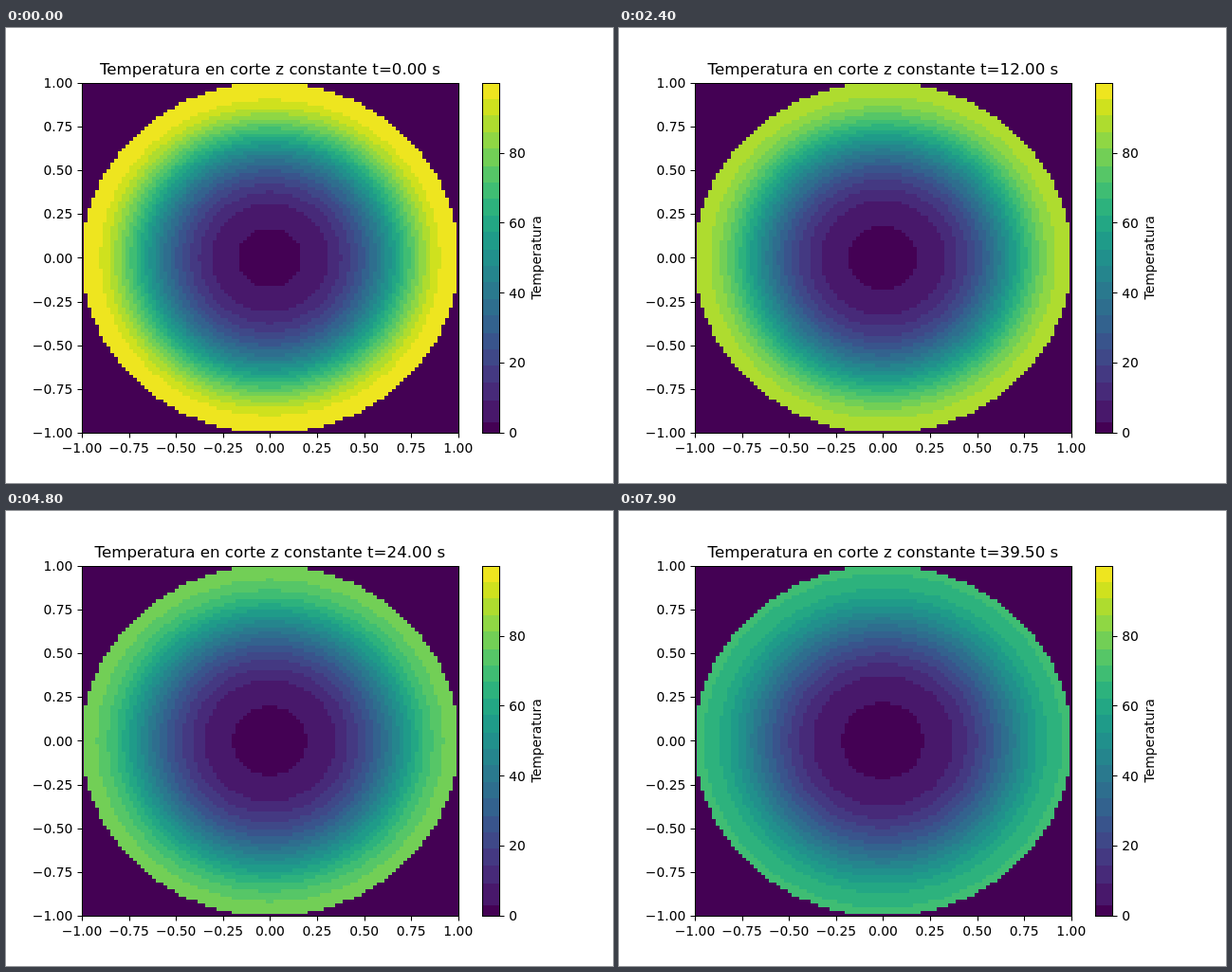
Recreate the animation shown at these times as an HTML page with a canvas. Size 640x480 px, loop 8 s.

```html
<!DOCTYPE html>
<html lang="es">
<head>
<meta charset="utf-8">
<style>
html, body { margin: 0; width: 100%; height: 100%; overflow: hidden; background: #fff; }
canvas, svg { position: absolute; left: 0; top: 0; }
text { font: 13.89px "DejaVu Sans", sans-serif; }
#title { font-size: 16.67px; }
path { fill: none; stroke: #000; stroke-width: 1.1; }
</style>
</head>
<body>
<canvas id="map" width="640" height="480"></canvas>
<svg id="axes" width="640" height="480"></svg>
<script>
const ctx = document.getElementById('map').getContext('2d');
const svg = document.getElementById('axes');
const LEFT = 80, TOP = 57.6, WIDTH = 396.8, HEIGHT = 369.6;
const BOTTOM = TOP + HEIGHT, MIDX = LEFT + WIDTH / 2, MIDY = TOP + HEIGHT / 2;
const BAR_X = 502, BAR_END = 520;
const N = 100, FRAME_MS = 100, FRAMES = 80, STEP_S = 0.5;

const VIRIDIS = ('440154 481568 482677 453781 3f4788 39558c 32648e 2d718e 287d8e 238a8d ' +
  '1f968b 20a386 29af7f 3cbc75 56c667 74d055 94d840 b8de29 dce318 fde725')
  .split(' ').map(h => [0, 2, 4].map(i => parseInt(h.slice(i, i + 2), 16)));

function viridis(v) {
  const x = Math.min(Math.max(v, 0), 1) * (VIRIDIS.length - 1);
  const i = Math.min(Math.floor(x), VIRIDIS.length - 2);
  return `rgb(${VIRIDIS[i].map((c, k) => Math.round(c + (VIRIDIS[i + 1][k] - c) * (x - i)))})`;
}

// The colour map is reduced to flat bands: two uneven ones, then 19 equal ones.
const BAND = 232 / 19;
const bandOf = v => {
  const x = v * 256;
  return x < 8 ? 0 : x < 24 ? 1 : 2 + Math.min(18, Math.floor((x - 24) / BAND));
};
const bands = Array.from({ length: 21 }, (_, i) =>
  viridis(i === 0 ? 0 : i === 1 ? 16 / 256 : (24 + (i - 1.5) * BAND) / 256));

// Grid nodes lie on [-1, 1]; each cell is centred on its node, and the axes clip the outer ones.
const edge = (i, mid, size) => {
  const e = Math.max(-1, Math.min(1, (2 * i - N) / (N - 1)));
  return Math.round(mid + e * size / 2);
};
const cells = [];
for (let j = 0; j < N; j++) {
  for (let i = 0; i < N; i++) {
    const r = Math.hypot(2 * i - N + 1, 2 * j - N + 1) / (N - 1);
    if (r > 1) continue;
    const x = edge(i, MIDX, WIDTH), y = edge(j, MIDY, HEIGHT);
    cells.push({
      x, y,
      w: edge(i + 1, MIDX, WIDTH) - x,
      h: edge(j + 1, MIDY, HEIGHT) - y,
      heat: Math.exp(-5 * (1 - r) ** 2)
    });
  }
}

function drawMap(seconds) {
  const decay = Math.exp(-0.01 * seconds);
  ctx.fillStyle = bands[0];
  ctx.fillRect(LEFT, 58, 397, 369);
  for (const c of cells) {
    ctx.fillStyle = bands[bandOf(c.heat * decay)];
    ctx.fillRect(c.x, c.y, c.w, c.h);
  }
}

function drawBar() {
  for (let i = 0; i < 256; i++) {
    const y = Math.round(BOTTOM - (i + 1) / 256 * HEIGHT);
    ctx.fillStyle = bands[bandOf(i / 256)];
    ctx.fillRect(BAR_X, y, BAR_END - BAR_X, Math.round(BOTTOM - i / 256 * HEIGHT) - y);
  }
}

function buildAxes() {
  const snap = v => Math.round(v) + 0.5;
  const label = (x, y, text, anchor, extra = '') =>
    `<text x="${x}" y="${y}" text-anchor="${anchor}" ${extra}>${text}</text>`;
  let lines = 'M80.5 58.5H477.5V427.5H80.5ZM502.5 58.5H520.5V427.5H502.5Z';
  let texts = label(MIDX, 49, '', 'middle', 'id="title"');
  for (let k = 0; k <= 8; k++) {
    const value = (k / 4 - 1).toFixed(2).replace('-', '\u2212');
    const x = LEFT + k / 8 * WIDTH, y = BOTTOM - k / 8 * HEIGHT;
    lines += `M${snap(x)} 428v4.5M80 ${snap(y)}h-4.5`;
    texts += label(x, 448, value, 'middle') + label(70.3, y + 5.2, value, 'end');
  }
  for (let v = 0; v <= 80; v += 20) {
    const y = BOTTOM - v / 100 * HEIGHT;
    lines += `M521 ${snap(y)}h4.5`;
    texts += label(530.2, y + 5.2, v, 'start');
  }
  texts += label(0, 0, 'Temperatura', 'middle', `transform="translate(563.5 ${MIDY}) rotate(-90)"`);
  svg.innerHTML = `<path d="${lines}"/>` + texts;
}

buildAxes();
drawBar();
const title = document.getElementById('title');
const start = performance.now();
let shown = -1;

function tick() {
  const frame = Math.floor((performance.now() - start) / FRAME_MS) % FRAMES;
  if (frame !== shown) {
    shown = frame;
    const seconds = frame * STEP_S;
    drawMap(seconds);
    title.textContent = `Temperatura en corte z constante t=${seconds.toFixed(2)} s`;
  }
  requestAnimationFrame(tick);
}
tick();
</script>
</body>
</html>
```
